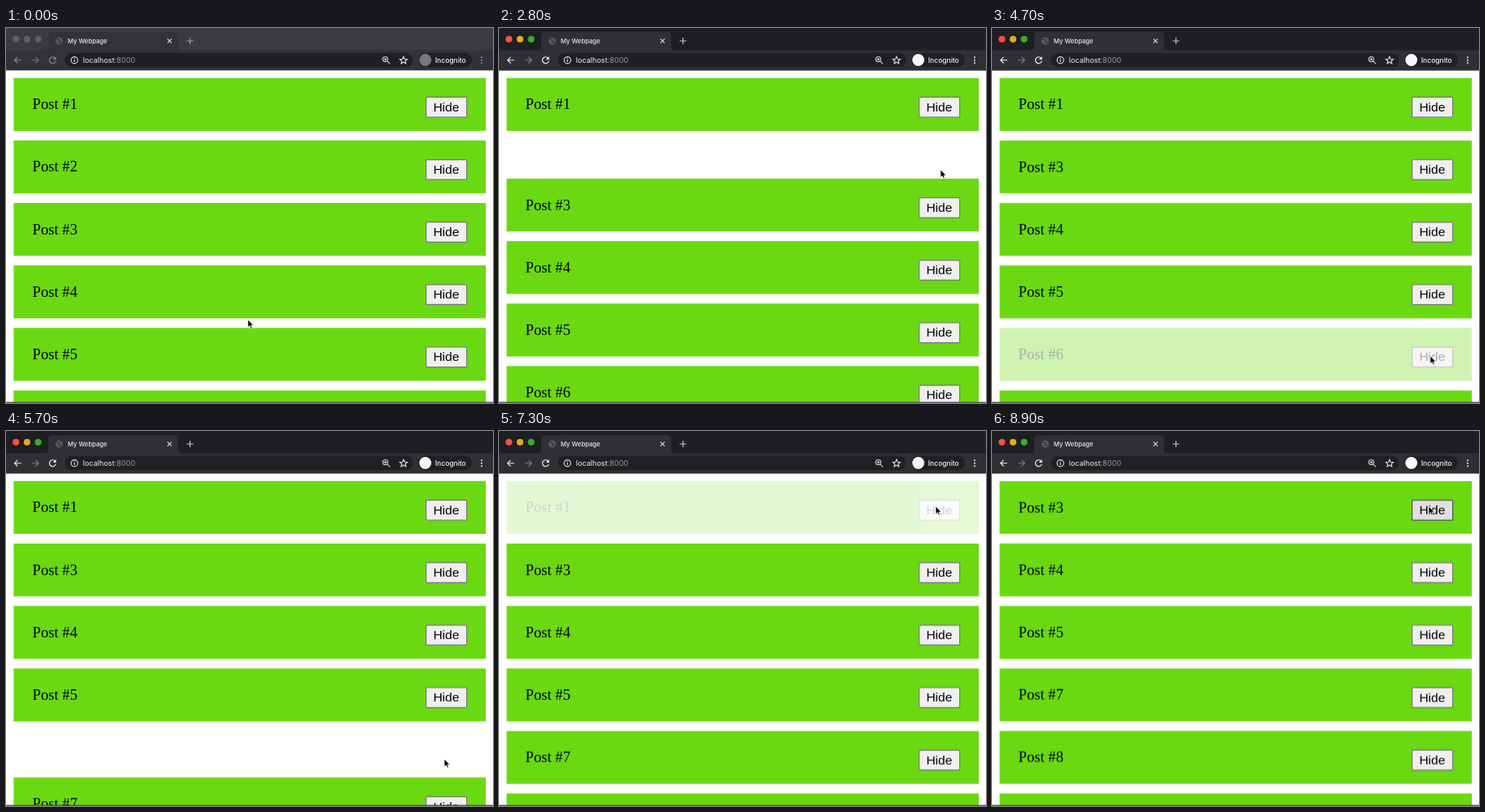
An HTML page for the animation above (9 s loop, 600 px wide and 463 px high).

```html
<!DOCTYPE html>
<html lang="en">
<head>
<meta charset="utf-8">
<title>My Webpage</title>
<style>
  html, body { margin: 0; width: 100%; height: 100%; overflow: hidden; background: #fff; }
  svg { display: block; width: 600px; height: 463px; }
  .ui { font-family: Inter, Roboto, sans-serif; }
  .label { font: 18.67px "Liberation Serif", "Times New Roman", serif; }
  .btn-text { font: 15.56px "Liberation Sans", Arial, sans-serif; }
  .card { fill: #6ad911; }
  .btn { fill: #efefef; stroke: #767676; stroke-width: 1.17px; }
  .line { fill: none; stroke-width: 1.15; }

  /* One loop is 9 s: 1% = 90 ms */
  .fade1, .fade2, .fade6, .up1, .up2, .up6, #active, #cursor, .btn {
    animation: 9s ease infinite;
  }
  .fade1 { animation-name: fade1; }
  .fade2 { animation-name: fade2; }
  .fade6 { animation-name: fade6; }
  .up1 { animation-name: up1; }
  .up2 { animation-name: up2; }
  .up6 { animation-name: up6; }
  #active { animation-name: activate; animation-timing-function: step-end; }
  #cursor { animation-name: point; animation-timing-function: ease-in-out; }

  @keyframes fade2 { 0%, 13.11% { opacity: 1 } 29.78%, 100% { opacity: 0 } }
  @keyframes fade6 { 0%, 45.67% { opacity: 1 } 62.33%, 100% { opacity: 0 } }
  @keyframes fade1 { 0%, 72.38% { opacity: 1 } 89.04%, 100% { opacity: 0 } }

  @keyframes up2 { 0%, 29.78% { transform: translateY(0) } 35.33%, 100% { transform: translateY(-77.15px) } }
  @keyframes up6 { 0%, 62.33% { transform: translateY(0) } 67.89%, 100% { transform: translateY(-77.15px) } }
  @keyframes up1 { 0%, 89.04% { transform: translateY(0) } 94.6%, 100% { transform: translateY(-77.15px) } }

  @keyframes activate { 0% { opacity: 0 } 2.2%, 100% { opacity: 1 } }

  @keyframes point {
    0%, 1.7% { transform: translate(298px, 360px) }
    11.1%, 35.4% { transform: translate(544px, 175px) }
    44.4%, 64% { transform: translate(540px, 405px) }
    70%, 100% { transform: translate(538px, 93px) }
  }

  /* Button hover, following the pointer */
  .btn { animation-timing-function: step-end; }
  .hover1 { animation-name: hover1; }
  .hover2 { animation-name: hover2; }
  .hover3 { animation-name: hover3; }
  .hover4 { animation-name: hover4; }
  .hover5 { animation-name: hover5; }
  .hover6 { animation-name: hover6; }
  @keyframes hover1 { 69% { fill: #e0e0e0; stroke: #4f4f4f } }
  @keyframes hover1 {
    0% { fill: #efefef; stroke: #767676 }
    69%, 100% { fill: #e0e0e0; stroke: #4f4f4f }
  }
  @keyframes hover2 {
    0% { fill: #efefef; stroke: #767676 }
    9.3%, 100% { fill: #e0e0e0; stroke: #4f4f4f }
  }
  @keyframes hover3 {
    0%, 37% { fill: #efefef; stroke: #767676 }
    35.4%, 97.3%, 100% { fill: #e0e0e0; stroke: #4f4f4f }
  }
  @keyframes hover4 {
    0%, 39.3%, 100% { fill: #efefef; stroke: #767676 }
    38.7% { fill: #e0e0e0; stroke: #4f4f4f }
  }
  @keyframes hover5 {
    0%, 41.2%, 100% { fill: #efefef; stroke: #767676 }
    40.6% { fill: #e0e0e0; stroke: #4f4f4f }
  }
  @keyframes hover6 {
    0% { fill: #efefef; stroke: #767676 }
    42.9%, 100% { fill: #e0e0e0; stroke: #4f4f4f }
  }
</style>
</head>
<body>
<svg id="stage" viewBox="0 0 600 463">
  <rect width="600" height="463" fill="#fff"/>
  <g id="posts"></g>
  <rect y="461.6" width="600" height="1.4" fill="#55575a"/>
  <g id="inactive" class="ui"></g>
  <g id="active" class="ui"></g>
  <path id="cursor" d="M0 0V9.6L2.2 7.6L3.7 11L5.3 10.3L3.9 7H6.8Z" fill="#000" stroke="#fff" stroke-width=".7"/>
</svg>
<script>
  const TOP = 61.7, PITCH = 77.15;
  const $ = id => document.getElementById(id);

  function post(n) {
    const y = TOP + (n - 1) * PITCH;
    return `<g class="fade${n}">
      <rect class="card" x="9.4" y="${y}" width="581.8" height="65.3"/>
      <text class="label" x="32.5" y="${y + 38.5}">Post #${n}</text>
      <rect class="btn hover${n}" x="517.6" y="${y + 23.7}" width="50" height="24.6" rx="1"/>
      <text class="btn-text" x="526.4" y="${y + 41}">Hide</text>
    </g>`;
  }

  const posts = (from, to) =>
    Array.from({ length: to - from + 1 }, (_, i) => post(from + i)).join('');

  // Everything below a hidden post sits in a group that moves up
  const after = (n, inner) => `<g class="up${n}">${inner}</g>`;

  $('posts').innerHTML =
    post(1) + after(1, post(2) + after(2, posts(3, 6) + after(6, posts(7, 10))));

  const dot = (x, y, r, fill) => `<circle cx="${x}" cy="${y}" r="${r}" fill="${fill}"/>`;
  const line = (d, color) => `<path class="line" d="${d}" stroke="${color}"/>`;
  const pill = (x, w) => `<rect x="${x}" y="30.8" width="${w}" height="17.4" rx="8.7" fill="#1f2023"/>`;
  const text = (x, y, size, weight, fill, s) =>
    `<text x="${x}" y="${y}" font-size="${size}" font-weight="${weight}" fill="${fill}">${s}</text>`;

  function browser({ strip, bar, lights, nav, dim, icon, badge }) {
    const lightDots = lights.map((c, i) => dot(12.2 + i * 13.7, 13.8, 4.1, c)).join('');
    const menu = [36.3, 39.8, 43.3].map(y => dot(586, y, 1, nav)).join('');
    return `
      <rect width="600" height="52.2" fill="${strip}"/>
      <rect y="27.5" width="600" height="24.7" fill="${bar}"/>
      <path d="M47 28Q52 28 52 23V10Q52 5 57 5H207Q212 5 212 10V23Q212 28 217 28Z" fill="${bar}"/>
      ${lightDots}
      ${dot(65.5, 16, 4.6, '#56585c')}
      ${line('M62.3 14.2Q65 13.2 65.6 15.6T68.6 18', bar)}
      ${text(76, 18.8, 7.7, 500, '#e6e7e9', 'My Webpage')}
      ${line('M198.9 13.4L204.1 18.6M204.1 13.4L198.9 18.6', '#d9dadc')}
      ${line('M222.6 16H230.8M226.7 11.9V20.1', icon)}
      ${line('M18.8 39.7H10.6M14.4 35.9L10.6 39.7L14.4 43.5', nav)}
      ${line('M32 39.7H40.2M36.4 35.9L40.2 39.7L36.4 43.5', dim)}
      ${line('M60.5 37.1A4 4 0 1 0 61.4 40.6', nav)}
      <path d="M61.7 35V38.9H57.8Z" fill="${nav}"/>
      ${pill(72.5, 429)}
      ${pill(508, 66)}
      <circle class="line" cx="84.3" cy="39.7" r="4.1" stroke="#d9dadc"/>
      ${line('M84.3 39.1V42M84.3 37.2V38.2', '#d9dadc')}
      ${text(94.8, 43, 9.1, 400, '#f0f1f2', 'localhost<tspan fill="#96999e">:8000</tspan>')}
      <circle class="line" cx="467.3" cy="38.6" r="3.1" stroke="#d0d1d3"/>
      ${line('M469.6 40.9L473 44.3M465.7 38.6H468.9M467.3 37V40.2', '#d0d1d3')}
      ${line('M489.8 35.2L491.1 38.2L494.4 38.5L491.9 40.7L492.7 43.9L489.8 42.2L486.9 43.9L487.7 40.7L485.2 38.5L488.5 38.2Z', '#d9dadc')}
      ${dot(516.6, 39.5, 7.4, badge)}
      ${text(528.8, 42.8, 8.5, 500, '#f0f1f2', 'Incognito')}
      ${menu}`;
  }

  $('inactive').innerHTML = browser({
    strip: '#3a3b3f', bar: '#323338', lights: ['#5d5e61', '#5d5e61', '#5d5e61'],
    nav: '#8b8c8f', dim: '#727377', icon: '#a5a6a9', badge: '#77787b'
  });
  $('active').innerHTML = browser({
    strip: '#1e1f22', bar: '#2f3034', lights: ['#fa4e42', '#e3ab1d', '#3daa2e'],
    nav: '#eff0f1', dim: '#7d7e82', icon: '#c6c7c9', badge: '#f8f8f9'
  });
</script>
</body>
</html>
```
